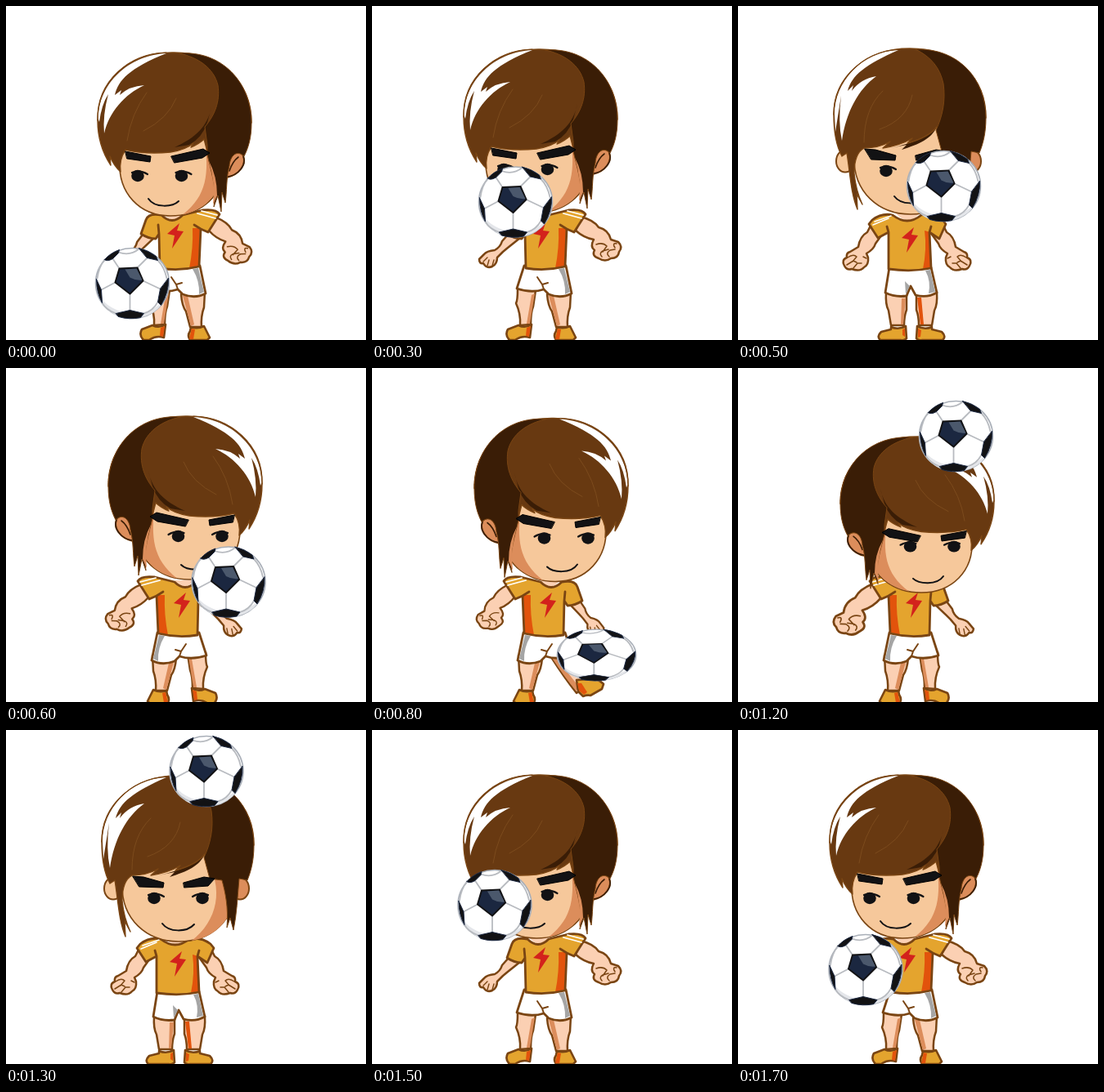
An HTML page for the animation above (1.8 s loop, 440 by 409 pixels).

```html
<!DOCTYPE html>
<html lang="en">
<head>
<meta charset="utf-8">
<title>Ball juggling</title>
<style>
html, body { margin: 0; width: 100%; height: 100%; overflow: hidden; background: #fff; }
svg { display: block; width: 100%; height: 100%; }
</style>
</head>
<body>
<svg id="stage" viewBox="0 0 440 409" stroke-linejoin="round" stroke-linecap="round"></svg>
<script>
const C = {
  hair: '#683911', dark: '#3a1d06', line: '#7a4513', skin: '#f6c89b', shade: '#dc8d5b',
  arm: '#fbd0b3', shirt: '#e4a42e', orange: '#e2530c', red: '#d3221c', gray: '#a5a5a5',
  ink: '#121214', navy: '#1b2740'
};
const path = (d, fill = 'none', stroke = 'none', w = 1) =>
  `<path d="${d}" fill="${fill}" stroke="${stroke}" stroke-width="${w}"/>`;
const line = (d, color = C.line, w = 1.6) => path(d, 'none', color, w);
const limb = d => path(d, C.arm, C.line, 2.5);
const shoe = d => path(d, C.shirt, C.line, 2.6);
const brow = d => path(d, C.ink, '#000', 1);
const group = (id, body) => `<g id="${id}">${body}</g>`;
const flip = (s, w) => `<g transform="translate(${w}) scale(-1 1)">${s}</g>`;

const eye = (x, y, turn) =>
  `<ellipse cx="${x}" cy="${y}" rx="7.8" ry="7.2" fill="${C.ink}"/>` +
  line(`M${x - 7 * turn} ${y - 4}Q${x + 2 * turn} ${y - 8} ${x + 12 * turn} ${y - 2}`, C.ink, 2.2);

// three-quarter view, facing left
const sideHead =
  path('M270 190C271 179 283 175 290 183C294 194 285 207 270 210Z', C.shade, C.line, 2) +
  line('M290 184Q294 194 284 203Q278 208 271 209M284 185Q277 190 273 202', C.dark, 1.6) +
  path('M139 190C137 229 163 257 201 257C235 257 260 237 266 205L252 140L150 150Z', C.skin, C.line, 1.6) +
  path('M243 165C248 205 246 232 216 255.500C242 250 260 232 265 205L252 150Z', C.shade) +
  group('sideEyes', eye(161, 208, 1) + eye(214.5, 208, 1)) +
  line('M174 236C182 248 204 246 211 239', C.ink, 2) +
  path('M112 140C111 93 149 57 203 57C262 56 300 93 300 143L262 170L246 178L242 163' +
    'Q236 169 226 173L229 168Q220 176 201 179Q170 182 146 176Q138 188 140 203Q132 196 127 184' +
    'L128 195C118 180 112 160 112 140Z', C.hair, C.line, 1.4) +
  path('M251 124C246 148 232 161 206 173L224 170Q240 161 246 143Z', C.dark) +
  path('M212 58C263 54 300 93 300 143C300 162 296 174 291 184C283 176 274 182 273 196' +
    'C269 211 270 227 268 241L264 228L263 252L259 232L254 246C258 222 250 200 246 182L246 170L243 148' +
    'C255 134 262 117 259 97C254 76 235 63 212 58Z', C.dark, C.line, 1) +
  path('M248 190Q258 208 258 232L253 243Q256 216 248 190Z', C.shade) +
  path('M196 58C150 60 113 95 112.500 138L114 142Q117 120 125 108Q118 134 120 156' +
    'C126 130 145 108 169 97Q151 98 139 109L141 103L133 109C137 91 151 76 196 58Z', '#fff') +
  line('M148 165Q153 132 172 106M168 153Q198 138 208 113', '#7c4b1d', 1) +
  line('M196 57C149 58 112 93 112 140', C.line, 1.2) +
  brow('M146 178L177 184L176 191L148 187Z') +
  brow('M202 184L241 175L249 180L240 186L206 192Z');

const ear = (x, fill) =>
  `<ellipse cx="${x}" cy="190" rx="11" ry="13.500" fill="${fill}" stroke="${C.line}" stroke-width="2"/>`;
const frontHead =
  ear(131, C.skin) + ear(286, C.shade) +
  path('M142 185C141 228 172 255 211 255C251 255 280 229 281 188L262 135L160 150Z', C.skin, C.line, 1.6) +
  path('M243 152C268 190 258 230 227 254C258 249 280 225 281 188L265 150Z', C.shade) +
  eye(181, 202, 1) + eye(240, 202, -1) +
  line('M191 233C199 244 221 244 230 234', C.ink, 2) +
  path('M186 174C214 168 233 160 243 148C236 163 222 169 200 176L206 170Z', C.dark) +
  path('M117 133C117 88 155 52 210 52C267 52 303 88 303 137L262 165L243 148' +
    'Q233 161 207 168L213 162Q198 171 177 174L186 166Q172 174 154 174C145 179 142 190 142 205Q144 226 152 243' +
    'L145 230L146 249C138 230 137 205 133 180L127 184C119 169 117 151 117 133Z', C.hair, C.line, 1.4) +
  path('M217 53C270 51 303 90 303 137C303 157 299 170 295 180L285 178C283 200 282 222 278 241L274 226' +
    'L270 238C272 212 268 195 264 180L249 178L242 152C250 135 254 116 251 95C247 76 236 62 217 53Z', C.dark, C.line, 1) +
  path('M196 54C150 56 118 94 118 132L119 154L126 110Q122 142 127 165C132 130 147 102 169 86' +
    'Q150 89 139 104L141 97L134 104C139 85 155 72 196 54Z', '#fff') +
  line('M154 167Q154 126 177 104M173 151Q207 139 213 109', '#7c4b1d', 1) +
  line('M196 53C152 56 117 91 117 133', C.line, 1.2) +
  brow('M155 175L168 176L193 183L192 189L163 188Z') +
  brow('M217 183L242 176L255 178L247 187L218 189Z');

const bolt = (x, y) =>
  `<path class="bolt" transform="translate(${x} ${y})" d="M5-16L-10-3L-1-1L-4 15L10-6L2-7Z" fill="${C.red}"/>`;

const sideLegs =
  group('standLeg',
    limb('M178 346Q178 361 176 364Q182 377 181 391L194 390Q194 375 197 368L200 348Z') +
    path('M195 354L189 389L193 389L199 352Z', C.shade) +
    shoe('M179 391Q187 395 195 390L193 406Q183 403 175 409H168Q162 403 166 396Z') +
    path('M189 394L194 392L192 405L188 404Z', C.orange)) +
  group('kickLeg',
    limb('M186 342L177 371L157 386L172 396Q187 377 203 352Z') +
    path('M202 353Q187 376 173 393L168 389Q184 371 196 352Z', C.shade) +
    shoe('M172 380L170 394L164 400Q159 398 155 399L141 391L139 385Q147 377 155 379Z') +
    path('M166 384L171 384L169 393L163 398L159 395Z', C.orange)) +
  limb('M214 353Q215 367 220 374L225 393L239 393Q238 380 242 369L243 350Z') +
  path('M216 355L222 355L230 390L226 392Z', C.shade) +
  shoe('M226 393Q234 396 242 392L249 406L246 409H225Q221 404 225 398Z') +
  path('M227 395L231 396L229 408H224Z', C.orange);

const nearArm =
  limb('M249 275Q259 284 271 286Q266 295 272 299Q268 306 277 309Q285 314 292 309Q301 309 302 301' +
    'Q307 295 301 289L292 286Q289 274 277 271Q271 262 255 258Z') +
  line('M274 292Q282 289 287 294L282 301M281 307Q277 303 282 300L289 298M290 307Q285 303 291 299L297 298M297 296Q293 290 299 291', C.line, 1.5);
const farArm =
  limb('M167 279L159 288Q157 295 150 299Q140 300 137 304L131 310Q131 316 136 315Q140 322 147 319' +
    'Q153 316 153 308L160 301L166 296L181 284Z') +
  line('M136 313L141 308M141 318L143 311M147 318L149 311', C.line, 1.4);

const sideTee = 'M190 256Q174 253 171 262L165 279Q174 285 183 285L187 279L188 321Q212 325 236 319L238 273' +
  'L247 277L261 255Q257 248 240 250L216 256Q203 269 190 256Z';
const sideTop =
  group('nearArm', nearArm) + group('farArm', farArm) +
  path('M186 318L237 318L244 352Q231 359 216 353L210 347Q195 352 177 346Z', '#fff', C.line, 2.8) +
  path('M228 322L235 321L242 350L236 353Q237 337 228 322Z', C.gray) +
  line('M215 339L208 341L202 332M208 341L210 347', C.line, 2) +
  path(sideTee, C.shirt) +
  path('M228 272L238 272L235 318L224 321Q229 296 228 272Z', C.orange) +
  path('M192 254H216Q204 269 192 254Z', C.arm) +
  line(sideTee + 'M187 279L186 268M238 273L230 268', C.line, 2.8) +
  line('M234 254L256 260M239 251L258 256', '#fff', 1.8) +
  bolt(207, 282);

const frontArm =
  limb('M164 265L158 277Q149 282 147 295L137 301Q132 302 133 308Q126 311 130 318Q133 324 139 322' +
    'Q149 326 154 320Q160 317 159 308L157 303Q166 298 168 291L178 277Z') +
  line('M134 308Q141 303 145 307L140 313M133 317L141 312L145 314M141 321L146 315L151 315M153 307L157 309', C.line, 1.5);
const frontLeg =
  limb('M181 350Q180 366 184 373L187 391L203 391Q203 380 206 372V354Z') +
  shoe('M187 393Q196 397 205 392L206 407Q203 410 199 409H174Q169 405 175 399L187 396Z');
const frontTee = 'M189 256Q176 253 164 262L160 267L171 284L184 277L184 322Q212 326 236 321L234 277' +
  'L246 285L254 267L250 262Q238 253 224 256Q207 270 189 256Z';
const frontBody =
  frontLeg + flip(frontLeg, 424) +
  path('M200 358H205L202 390H199Z', C.shade) +
  path('M219 357H224L227 390H223Z', C.orange) +
  path('M201 396L204 395V405L201 403ZM220 395L224 397L223 405L220 406Z', C.orange) +
  frontArm + flip(frontArm, 413) +
  path('M185 320H236L243 351Q231 358 217 354L211 343L206 355Q192 357 180 351Z', '#fff', C.line, 2.8) +
  path('M229 324L235 323L241 350L233 352Q236 337 229 324ZM204 337L210 343L205 353Z', C.gray) +
  path(frontTee, C.shirt) +
  path('M228 275L235 277L235 320L226 322Q231 298 228 275Z', C.orange) +
  path('M193 254H222Q207 270 193 254Z', C.arm) +
  line(frontTee + 'M184 277L182 270M234 277L236 270', C.line, 2.8) +
  line('M167 264L187 257M165 268L184 260', '#fff', 1.6) +
  bolt(210, 287);

const patches = [
  'M-34-29Q-27-37-16-41L-17-37L-24-30Q-31-26-34-29Z',
  'M8-43Q20-40 29-33L31-28L18-31Z',
  'M44-6Q45 11 35 27L31 23L34 7Z',
  'M-20 37L-3 33L14 37L10 42Q-4 45-17 41Z',
  'M-44-5L-38 8L-37 24Q-44 12-44-5Z'
].map(d => path(d, C.ink, C.navy, 1)).join('');
const ball =
  '<ellipse rx="45" ry="43" fill="#fff" stroke="#a9afb8" stroke-width="1.500"/>' +
  path('M-42 12C-31 38 19 49 40 18C31 40 9 43-3 43C-23 43-39 28-42 12Z', '#e4e6ea') +
  line('M-16-18L-24-30M6-19L18-31M13-3L34 7M-3 13V33M-21-1L-38 8M-17-38Q-3-33 8-42M31-28Q39-20 42-6M31 23Q25 34 14 37M-20 37Q-32 33-37 24M-34-29Q-41-20-43-6', '#b8bbc0', 1.8) +
  patches +
  path('M-16-18L6-19L13-3L-3 13L-21-1Z', C.navy, C.ink, 2) +
  path('M-9-17L5-18L12-4Q4-3-3-7Z', '#4b586c');

const stage = document.getElementById('stage');
stage.innerHTML =
  group('sideLegs', sideLegs) + group('sideTop', sideTop) + group('sideHead', sideHead) +
  group('frontBody', frontBody) + group('frontHead', frontHead) + group('ball', ball);

const $ = id => document.getElementById(id);
const show = (id, on) => $(id).setAttribute('display', on ? 'inline' : 'none');
const move = (id, t) => $(id).setAttribute('transform', t);
const sideBolt = $('sideTop').querySelector('.bolt');
const turn = (id, x, y, angle, size) =>
  move(id, `translate(${x} ${y}) rotate(${angle}) scale(${size}) translate(${-x} ${-y})`);

// one row per step: ball x, ball y, head drop, eye shift
const steps = [
  [154.5, 339.5, 0, 0], [149, 351.5, 0, 0], [162, 296, -2, -2], [175.5, 240, -4, -4],
  [213, 207, 0, 0], [251.5, 220.5, 0, 0], [272, 262, 2, -4], [274, 309, 4, -2],
  [274.5, 351.5, 4.5, -4], [274, 290, 3, -4], [273, 216, 2, -5], [270, 143, 4, -6],
  [266.5, 83.5, 27, -10], [245, 50.5, 4, 0], [186, 126, -2, -4], [150, 214.5, -2, -4],
  [153, 254, -2, -2], [156, 293.5, -2, 0]
];
const views = 'LLLLFFRRRRRRRFLLLL';
const LOOP = 1800;

function draw(ms) {
  const i = Math.floor(ms % LOOP / 100);
  const [x, y, drop, look] = steps[i];
  const view = views[i], front = view === 'F', right = view === 'R';
  const kick = i === 1 || i === 8, header = i === 12;

  for (const id of ['sideLegs', 'sideTop', 'sideHead']) show(id, !front);
  for (const id of ['frontBody', 'frontHead']) show(id, front);
  show('standLeg', !kick);
  show('kickLeg', kick);

  const mirror = (w, dy) => right ? `translate(${w} ${dy}) scale(-1 1)` : '';
  move('sideLegs', mirror(422, 2));
  move('sideTop', mirror(422, 6));
  sideBolt.setAttribute('transform', `translate(207 ${right ? 285 : 282}) scale(${right ? -1 : 1} 1)`);
  move('sideHead', mirror(425, 0) + ` translate(0 ${57 + drop}) scale(1 ${header ? 0.955 : 1}) translate(0 -57)`);
  move('sideEyes', `translate(0 ${look})`);
  move('frontHead', `translate(0 ${drop})`);

  const swing = kick ? 11 : right ? 7 : i === 0 ? 7 : 0;
  const reach = kick ? 0.93 : header ? 1.1 : 1;
  turn('nearArm', 250, 265, swing, reach);
  turn('farArm', 172, 275, -swing * 0.7, Math.min(1, reach));
  move('ball', `translate(${x} ${y})` + (kick ? ' scale(1.07 .73)' : ''));
}

function tick() {
  draw(performance.now());
  requestAnimationFrame(tick);
}
tick();
</script>
</body>
</html>
```
